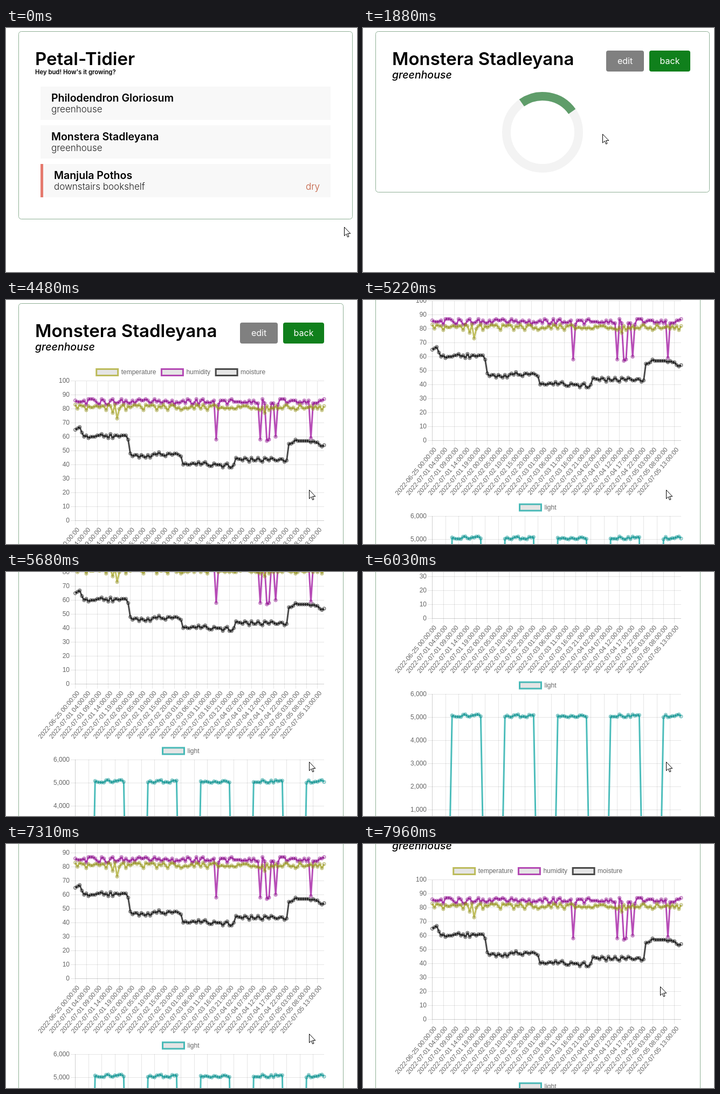
These frames come from a looping animation (651 by 454 pixels, 8000 ms). An HTML page:

```html
<!DOCTYPE html>
<html lang="en">
<head>
<meta charset="utf-8">
<title>Plant monitor</title>
<style>
  html, body { margin: 0; width: 100%; height: 100%; overflow: hidden; background: #fff; }
  svg { display: block; font-family: Inter, sans-serif; }
  .card { fill: #fff; stroke: #8fb096; }
  .title { font-size: 33px; font-weight: 600; }
  .tag { font-size: 11.3px; font-weight: 600; }
  .name { font-size: 19.5px; font-weight: 600; }
  .item.hover .name { fill: #10801c; }
  .place { font-size: 17px; font-weight: 300; fill: #222; }
  .dry { fill: #c0593a; text-anchor: end; }
  .sub { font-size: 19.5px; font-weight: 500; font-style: italic; }
  .button { font-size: 16px; fill: #fff; text-anchor: middle; }
  .chart { font: 12px "Liberation Sans", Arial, sans-serif; fill: #666; }
  .grid { stroke: #000; stroke-opacity: .1; shape-rendering: crispEdges; }
</style>
</head>
<body>
<svg id="stage" width="651" height="454" viewBox="0 0 651 454">
  <g id="list">
    <rect class="card" x="23.5" y="6.5" width="619" height="349" rx="5"/>
    <text class="title" x="54" y="69">Petal-Tidier</text>
    <text class="tag" x="54" y="86">Hey bud! How's it growing?</text>
  </g>
  <g id="detail">
    <rect id="card" class="card" x="23.5" y="6.5" rx="5"/>
    <text class="title" x="54" y="69">Monstera Stadleyana</text>
    <text class="sub" x="54" y="94">greenhouse</text>
    <g id="buttons" class="button">
      <rect x="451" y="42" width="70" height="39" rx="4" fill="#808080"/>
      <text x="486" y="67">edit</text>
      <rect x="531" y="42" width="76" height="39" rx="4" fill="#10801c"/>
      <text x="569" y="67">back</text>
    </g>
    <g id="spinner" fill="none" stroke-width="16">
      <circle cx="333" cy="194" r="67" stroke="#f3f3f3"/>
      <path id="arc" d="M333 127A67 67 0 0 1 400 194" stroke="#5f9d6a"/>
    </g>
    <g id="charts" class="chart"></g>
  </g>
  <path id="cursor" d="M.5 .5V16.8L4.2 13.2L6.7 19L9 18L6.6 12.4H11.8Z" fill="#fff" stroke="#000"/>
</svg>
<script>
const LOOP = 8000, OPEN = 1820, LOADED = 1940, GROW = 720;
const $ = id => document.getElementById(id);

function add(parent, tag, attrs, text) {
  const el = document.createElementNS('http://www.w3.org/2000/svg', tag);
  for (const key in attrs) el.setAttribute(key, attrs[key]);
  if (text !== undefined) el.textContent = text;
  parent.append(el);
  return el;
}
const show = (el, on) => el.setAttribute('display', on ? 'inline' : 'none');

// Plant list
const plants = [
  ['Philodendron Gloriosum', 'greenhouse'],
  ['Monstera Stadleyana', 'greenhouse'],
  ['Manjula Pothos', 'downstairs bookshelf', 'dry'],
];
const items = plants.map(([name, place, status], i) => {
  const y = 109 + 72 * i, x = status ? 89 : 84;
  const g = add($('list'), 'g', { class: 'item' });
  add(g, 'rect', { x: 64, y, width: 538, height: 62, fill: '#f8f8f8' });
  add(g, 'text', { class: 'name', x, y: y + 28 }, name);
  add(g, 'text', { class: 'place', x, y: y + 48 }, place);
  if (status) {
    add(g, 'rect', { x: 64, y, width: 5, height: 62, fill: '#e57a6e' });
    add(g, 'text', { class: 'place dry', x: 582, y: y + 48 }, status);
  }
  return { g, y };
});

// Sensor data, one reading per hour
const COUNT = 114, LEFT = 128.5, RIGHT = 590;
const px = i => LEFT + (RIGHT - LEFT) * i / (COUNT - 1);

function readings(seed, rule) {
  const noise = () => (seed = seed * 16807 % 2147483647) / 2147483647 * 2 - 1;
  noise();
  return Array.from({ length: COUNT }, (_, i) => rule(i, noise()));
}
// Linear interpolation over rows of [position, ...values]
function along(keys, t) {
  const n = keys.findIndex(k => k[0] > t);
  if (n < 0) return keys[keys.length - 1].slice(1);
  if (n === 0) return keys[0].slice(1);
  const a = keys[n - 1], b = keys[n], f = (t - a[0]) / (b[0] - a[0]);
  return a.slice(1).map((v, j) => v + (b[j + 1] - v) * f);
}
const hotDips = { 17: 77, 19: 73, 86: 77 };
const wetDips = { 64: 58, 84: 58, 87: 57, 88: 58, 91: 60, 107: 59 };
const soil = [[0, 65], [2, 67], [3, 63], [5, 60], [10, 60.5], [24, 59.5], [25, 46], [48, 47.5],
  [49, 41], [72, 39.5], [73, 44], [96, 44], [97, 57], [113, 54.5]];

const temperature = readings(4127, (i, n) => hotDips[i] || Math.round(81 + 2.3 * n));
const humidity = readings(9311, (i, n) => wetDips[i] || Math.round(85 + 2.2 * n));
const moisture = readings(2718, (i, n) => Math.round(along(soil, i)[0] + (i < 4 ? 0 : 1.7 * n)));
const light = readings(5501, (i, n) =>
  (i + 15) % 24 < 14 ? 5060 + 65 * n : i % 24 === 8 ? 100 : 40);

const two = n => String(n).padStart(2, '0');
function stamp(i) {
  const hour = i - 1;
  return i ? `2022-07-${two(1 + Math.floor(hour / 24))} ${two(hour % 24)}:00:00` : '2022-06-25 00:00:00';
}

// Builds a line chart and returns a function that sets how far it has grown
function chart(top, height, max, step, every, series) {
  const g = add($('charts'), 'g', {}), bottom = top + height;
  const line = (x1, y1, x2, y2) => add(g, 'line', { class: 'grid', x1, y1, x2, y2 });
  for (let v = 0; v <= max; v += step) {
    const y = Math.floor(bottom - height * v / max) + .5;
    line(120, y, RIGHT, y);
    add(g, 'text', { x: 118, y: y - .5, dy: '.35em', 'text-anchor': 'end' }, v.toLocaleString('en-US'));
  }
  for (let i = 0; i < COUNT; i += every) {
    const x = px(i), gx = Math.floor(x + .1) + .5;
    line(gx, top, gx, bottom + 8);
    add(g, 'text', {
      transform: `translate(${x + 5} ${bottom + 14.5}) rotate(-50)`, dy: '.35em', 'text-anchor': 'end',
    }, stamp(i));
  }
  line(LEFT, top, LEFT, bottom);
  line(LEFT, bottom, RIGHT, bottom);

  for (const s of series) {
    const mid = top - 16;
    add(g, 'rect', { x: s.x, y: mid - 6, width: 40, height: 12, fill: '#e5e5e5', stroke: s.color, 'stroke-width': 3 });
    add(g, 'text', { x: s.x + 46, y: mid - .5, dy: '.35em' }, s.label);
  }
  for (const s of [...series].reverse()) {
    s.path = add(g, 'path', { fill: 'none', stroke: s.color, 'stroke-width': 3, 'stroke-linejoin': 'round' });
    s.dots = s.data.map((_, i) => add(g, 'circle', {
      cx: px(i), r: 3, fill: '#000', 'fill-opacity': .1, stroke: s.color,
    }));
  }
  return grown => {
    for (const s of series) {
      const ys = s.data.map(v => bottom - height * v / max * grown);
      s.path.setAttribute('d', 'M' + ys.map((y, i) => `${px(i).toFixed(2)} ${y.toFixed(2)}`).join('L'));
      s.dots.forEach((dot, i) => dot.setAttribute('cy', ys[i]));
    }
  };
}
const growers = [
  chart(150.5, 260, 100, 10, 5, [
    { label: 'temperature', x: 167.7, color: 'rgba(166,164,28,.7)', data: temperature },
    { label: 'humidity', x: 288.4, color: 'rgba(153,0,153,.7)', data: humidity },
    { label: 'moisture', x: 389.1, color: 'rgba(0,0,0,.7)', data: moisture },
  ]),
  chart(551, 259, 6000, 1000, 6, [
    { label: 'light', x: 290.5, color: 'rgba(0,162,158,.7)', data: light },
  ]),
];

// Pointer path: time, x, y
const pointer = [[0, 627, 370], [40, 627, 370], [400, 530, 300], [810, 438, 220], [1100, 425, 160],
  [1350, 430, 168], [1680, 444, 197], [3600, 444, 197], [3990, 568, 384], [4080, 568, 384],
  [4300, 558, 370], [4480, 562, 353], [7840, 562, 353], [7960, 551, 265]];

// Wheel scrolling: start time, interval, offsets held in turn
const wheel = [
  [4750, 65, [38, 72, 84]],
  [5150, 67, [118, 149, 163, 168]],
  [5680, 70, [202, 236, 254, 290, 310, 324, 334, 362, 398, 420]],
  [6970, 67.5, [355, 310, 262, 236, 190, 160, 118, 92, 84]],
];
function scrollAt(t) {
  const run = wheel.filter(w => w[0] <= t).pop();
  if (!run) return 0;
  const [start, gap, offsets] = run;
  return offsets[Math.min(Math.floor((t - start) / gap), offsets.length - 1)];
}

let lastGrown = -1;
function draw(t) {
  const [x, y] = along(pointer, t).map(Math.round);
  const open = t >= OPEN, loaded = t >= LOADED;
  $('cursor').setAttribute('transform', `translate(${x} ${y})`);
  show($('list'), !open);
  show($('detail'), open);
  show($('spinner'), !loaded);
  show($('charts'), loaded);
  for (const item of items) {
    item.g.classList.toggle('hover', x >= 64 && x < 602 && y >= item.y && y < item.y + 62);
  }
  $('card').setAttribute('width', loaded ? 602 : 619);
  $('card').setAttribute('height', loaded ? 960 : 299);
  $('buttons').setAttribute('transform', `translate(${loaded ? -17 : 0} 0)`);
  $('arc').setAttribute('transform', `rotate(${(t - OPEN) * .16 - 45} 333 194)`);
  $('detail').setAttribute('transform', `translate(0 ${-scrollAt(t)})`);

  const p = Math.min(Math.max((t - LOADED) / GROW, 0), 1);
  const grown = 1 - (1 - p) ** 4;
  if (grown !== lastGrown) growers.forEach(grow => grow(grown));
  lastGrown = grown;
}

const begin = performance.now();
function tick() {
  draw((performance.now() - begin) % LOOP);
  requestAnimationFrame(tick);
}
tick();
</script>
</body>
</html>
```
